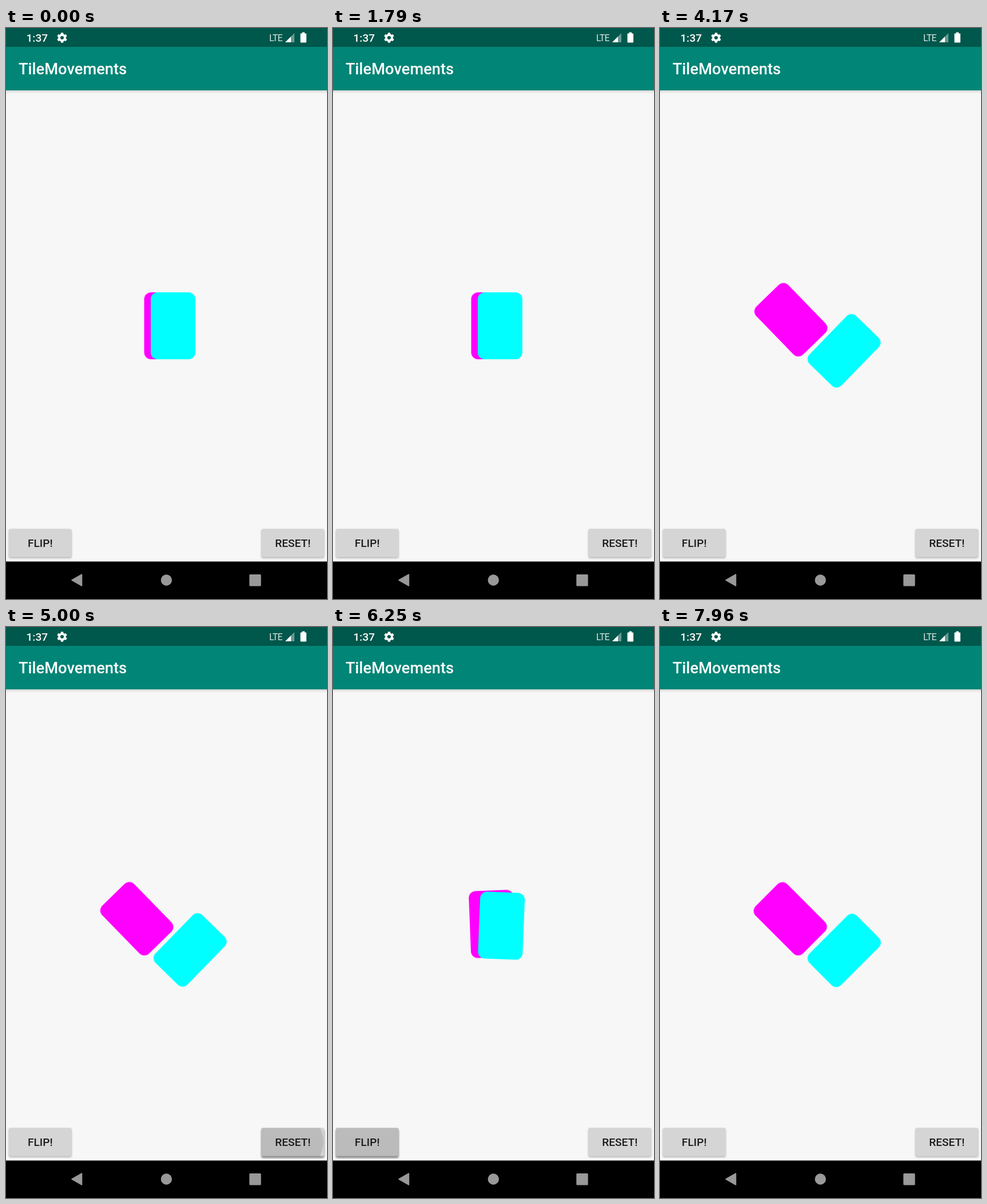
These frames come from a looping animation (561 px wide and 998 px high, 8 s). An HTML page:

```html
<!DOCTYPE html>
<html lang="en">
<head>
<meta charset="utf-8">
<title>Card flip</title>
<style>
  html, body { margin: 0; width: 100%; height: 100%; overflow: hidden; background: #f7f7f7; }
  svg { display: block; width: 100%; height: 100%; }
  text { font-family: Roboto, sans-serif; font-weight: 500; }
  .btn text { font-size: 19.1px; text-anchor: middle; fill: #1b1b1b; }
  .lift, .ripple { opacity: 0; }
</style>
</head>
<body>
<svg viewBox="0 0 561 998" preserveAspectRatio="none">
  <defs>
    <linearGradient id="edge" x2="0" y2="1">
      <stop offset="0" stop-color="#000" stop-opacity=".12"/>
      <stop offset="1" stop-color="#000" stop-opacity="0"/>
    </linearGradient>
    <filter id="soft" x="-20%" y="-40%" width="140%" height="180%">
      <feGaussianBlur stdDeviation="1.5"/>
    </filter>
    <clipPath id="face"><rect width="109.5" height="49.5" rx="2.7"/></clipPath>
  </defs>

  <rect width="561" height="998" fill="#f7f7f7"/>
  <rect y="109" width="561" height="6" fill="url(#edge)"/>
  <rect y="32" width="561" height="77" fill="#018576"/>
  <rect width="561" height="33" fill="#00574b"/>

  <g fill="#fff">
    <text x="35.5" y="24" font-size="19.1">1:37</text>
    <text x="460" y="22.5" font-size="16" letter-spacing="-.8" style="font-weight:400" fill-opacity=".85">LTE</text>
    <text x="22" y="81.3" font-size="27.3">TileMovements</text>
    <g id="gear" transform="translate(98 17)">
      <circle r="4.9" fill="none" stroke="#fff" stroke-width="3.7"/>
    </g>
    <path d="M488 25L504 9V25Z" fill-opacity=".4"/>
    <path d="M488 25L498 15V25Z"/>
    <path d="M517.5 7.5h4.500v2h2a1 1 0 0 1 1 1v14a1 1 0 0 1-1 1h-8.500a1 1 0 0 1-1-1v-14a1 1 0 0 1 1-1h2z"/>
  </g>

  <g id="cards"></g>
  <g id="buttons"></g>

  <rect y="932.500" width="561" height="65.500"/>
  <g fill="#999">
    <path d="M115 965L132.500 955V975Z" stroke="#999" stroke-width="1.500" stroke-linejoin="round"/>
    <circle cx="280.300" cy="965" r="9.700"/>
    <rect x="425.300" y="955" width="20.400" height="20.400" rx="1.500"/>
  </g>
</svg>
<script>
const LOOP = 8000, ANGLE = 45, TURN = 500;
const SINE = 'cubic-bezier(.37,0,.63,1)';
const $ = id => document.getElementById(id);

function add(parent, tag, attrs = {}, text = '') {
  const el = document.createElementNS('http://www.w3.org/2000/svg', tag);
  for (const k in attrs) el.setAttribute(k, attrs[k]);
  el.textContent = text;
  return parent.appendChild(el);
}

// rows: [time in ms, value, easing to the next row]
function play(el, prop, rows) {
  const last = rows[rows.length - 1][1];
  const frames = [[0, rows[0][1]], ...rows, [LOOP, last]].map(([t, v, easing = 'linear']) =>
    ({ offset: t / LOOP, [prop]: v, easing }));
  el.animate(frames, { duration: LOOP, iterations: Infinity });
}

for (const a of [0, 60, 120, 180, 240, 300])
  add($('gear'), 'path', { d: 'M-2.7-5.500L-1.900-8.800H1.900L2.700-5.500Z', transform: `rotate(${a})` });

// Each card turns about its own bottom left corner.
const turns = [[3715, 0, ANGLE], [4960, ANGLE, 0], [6178, 0, ANGLE]];
function card(x, color, side) {
  const g = add($('cards'), 'g', { transform: `translate(${x} 579)` });
  const el = add(g, 'rect', { y: -117, width: 78, height: 117, rx: 12, fill: color });
  el.style.transformOrigin = '0 0';
  play(el, 'transform', turns.flatMap(([t, from, to]) => [
    [t, `rotate(${side * from}deg)`, SINE],
    [t + TURN, `rotate(${side * to}deg)`]
  ]));
}
card(241.5, '#f0f', -1);
card(253, '#0ff', 1);

function button(x, label, touch, presses) {
  const size = { width: 109.5, height: 49.5, rx: 2.7 };
  const g = add($('buttons'), 'g', { class: 'btn', transform: `translate(${x} 875.5)` });
  add(g, 'rect', { ...size, y: 1.5, fill: '#000', 'fill-opacity': .3, filter: 'url(#soft)' });
  const lift = add(g, 'rect', { ...size, y: 3.5, class: 'lift', fill: '#000', 'fill-opacity': .3, filter: 'url(#soft)' });
  add(g, 'rect', { ...size, fill: '#d4d5d4' });
  const clip = add(g, 'g', { 'clip-path': 'url(#face)' });
  const ripple = add(clip, 'circle', { class: 'ripple', r: 61, fill: '#000', 'fill-opacity': .12 });
  ripple.style.transformOrigin = '0 0';
  add(g, 'text', { x: 54.8, y: 31.5 }, label);

  const start = `translate(${touch}px, 24px) scale(.7)`;
  const full = 'translate(54.8px, 24.7px) scale(1)';
  const fade = presses.flatMap(t => [[t, 0], [t + 40, 1], [t + 180, 1], [t + 400, 0]]);
  play(ripple, 'opacity', fade);
  play(lift, 'opacity', fade);
  play(ripple, 'transform', presses.flatMap(t => [
    [t, start], [t + 125, full], [t + 400, full, 'step-end'], [t + 410, start]
  ]));
}
button(5, 'FLIP!', 90, [3660, 6123]);
button(446.5, 'RESET!', 40, [4905]);
</script>
</body>
</html>
```
